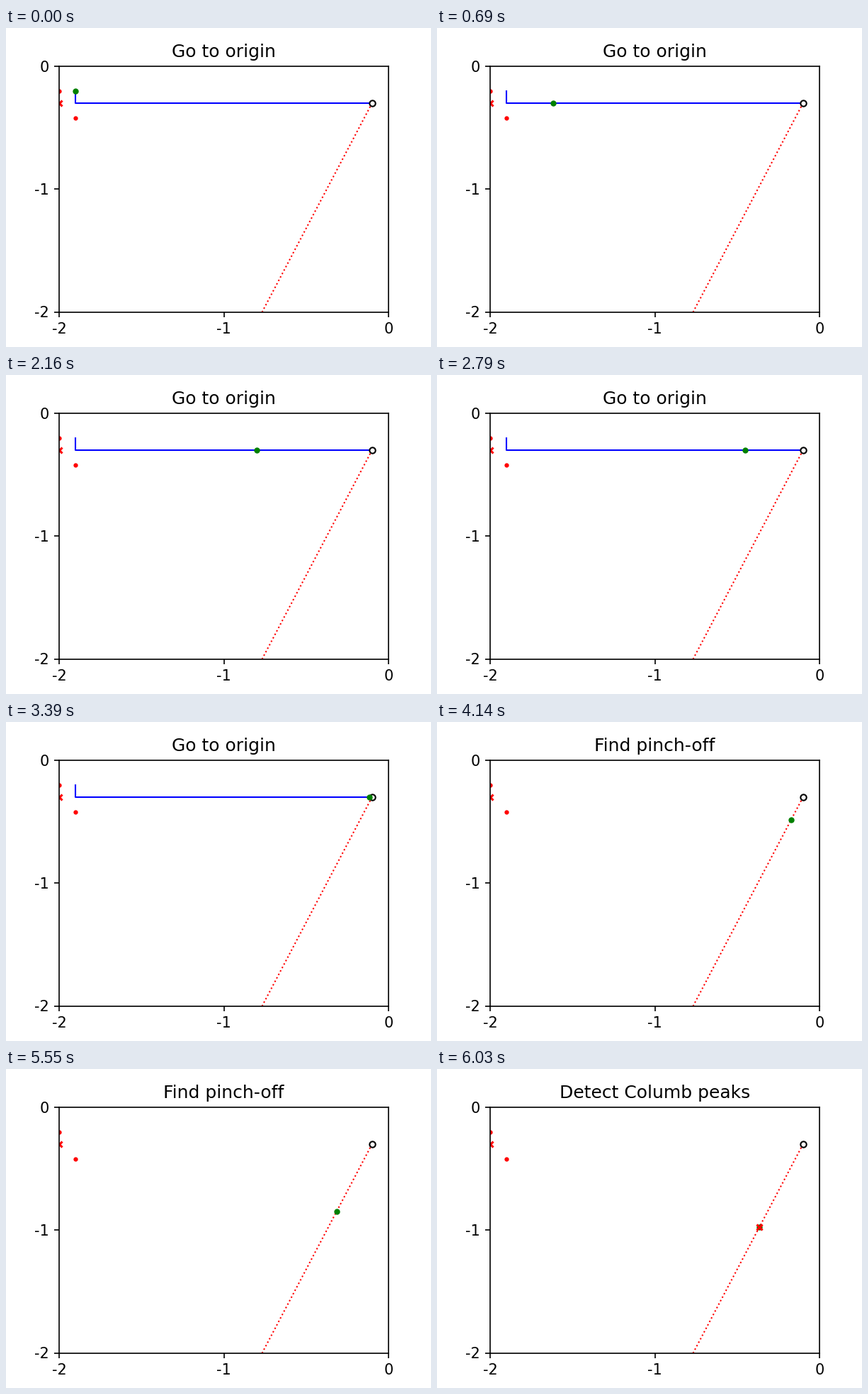
Animation, 600 px wide and 450 px high, one loop 8 s. Source, as a matplotlib script:

```python
import matplotlib.pyplot as plt
import numpy as np
from matplotlib.animation import FuncAnimation

plt.rcParams["font.family"] = "DejaVu Sans"

LOOP, INTERVAL, STEP = 8000, 20, 30       # milliseconds
START = np.array([-1.9, -0.2])
ORIGIN = np.array([-0.1, -0.3])
EXIT = np.array([-0.767, -2.0])           # where the search ray leaves the plot
DOWN_STEPS, WALK_STEPS, SEARCH_STEPS = 6, 114, 87

RAY = (EXIT - ORIGIN) / np.linalg.norm(EXIT - ORIGIN)
PEAK = ORIGIN + RAY * SEARCH_STEPS / 120

fig, ax = plt.subplots(figsize=(4, 3), dpi=150)
ax.set(xlim=(-2, 0), ylim=(-2, 0))
ticks, labels = [-2, -1, 0], ["-2", "-1", "0"]
ax.set_xticks(ticks, labels)
ax.set_yticks(ticks, labels)
title = ax.set_title("")


def mark(point, style, size, **kw):
    return ax.plot(*np.reshape(point, (2, 1)), style, ms=size, **kw)[0]


ax.plot(*zip(ORIGIN, ORIGIN + 2.5 * RAY), "r:", lw=1)
path, = ax.plot(*zip(START, (START[0], ORIGIN[1]), ORIGIN), "b-", lw=1)
mark((-2, -0.2), "r.", 4)
mark((-1.9, -0.42), "r.", 4)
mark((-2, -0.3), "rx", 4, mew=1.5)
mark(ORIGIN, "ko", 4, mfc="white", mew=1)
probe = mark(START, "g.", 6)
peak = mark(PEAK, "rx", 4, mew=1.5)


def position(n):
    if n <= DOWN_STEPS:
        return START - (0, n / 60)
    if n <= WALK_STEPS:
        return np.array([START[0] + (n - DOWN_STEPS) / 60, ORIGIN[1]])
    return ORIGIN + RAY * min(n - WALK_STEPS, SEARCH_STEPS) / 120


def update(i):
    n = (i * INTERVAL + INTERVAL // 2) // STEP
    walking = n <= WALK_STEPS
    found = n >= WALK_STEPS + SEARCH_STEPS
    x, y = position(n)
    probe.set_data([x], [y])
    path.set_visible(walking)
    peak.set_visible(found)
    title.set_text("Go to origin" if walking else
                   "Detect Columb peaks" if found else "Find pinch-off")
    return path, probe, peak, title


anim = FuncAnimation(fig, update, frames=LOOP // INTERVAL, interval=INTERVAL,
                     repeat=True, repeat_delay=0)
plt.show()
```
